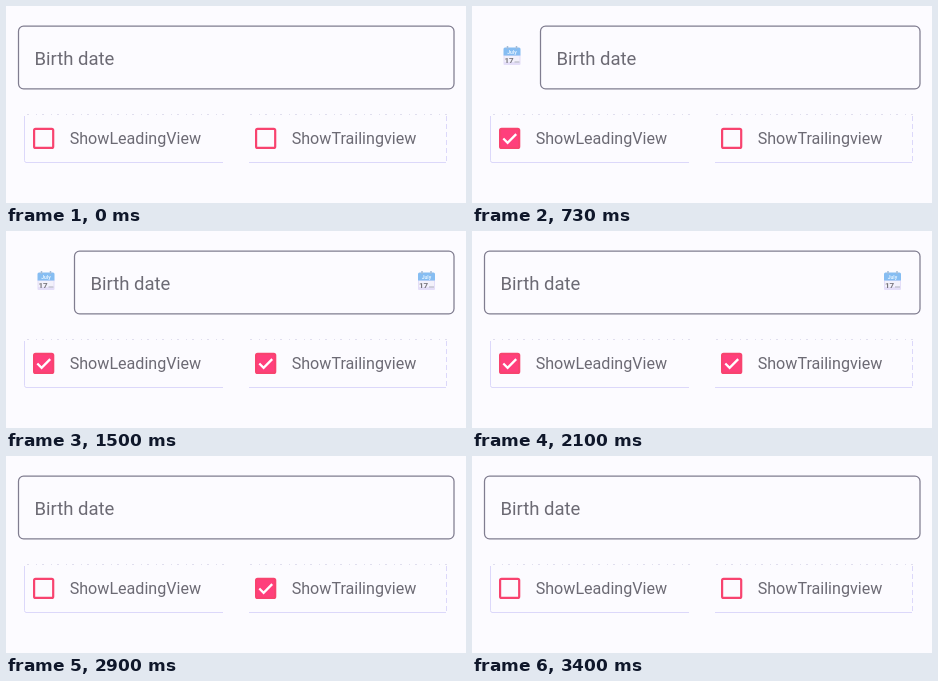
An HTML page for the animation above (3.53 s loop, 460 px wide and 197 px high).

```html
<!DOCTYPE html>
<html lang="en">
<head>
<meta charset="utf-8">
<style>
  html, body { margin: 0; width: 100%; height: 100%; overflow: hidden; background: #fcfbff; }
  svg { display: block; width: 460px; height: 197px; }
  text { font-family: Roboto, sans-serif; fill: #6c6a74; }
  .title { font-size: 18.5px; }
  .label { font-size: 16.1px; }
  .card { fill: none; stroke: #dcd8fa; }
  .dots { stroke-dasharray: 2 7 1 5; stroke: #e0deee; }
  .dashes { stroke-dasharray: 5 3; }
</style>
</head>
<body>
<svg viewBox="0 0 460 197">
  <defs>
    <g id="calendar">
      <rect x="1" y="9" width="17" height="10.5" rx="1" fill="#e4def8"/>
      <path d="M1 10V3.5q0-1.5 1.5-1.5h14q1.5 0 1.5 1.5V10z" fill="#86bdf2"/>
      <path d="M5 .5v3M14 .5v3" stroke="#a3bcd8" stroke-width="1.5"/>
      <text x="9.500" y="8" text-anchor="middle" style="font-size:5px;font-weight:700;fill:#e6f3ff">July</text>
      <path d="M2 10.500h15v6h-15z" fill="#f3f1fb"/>
      <text x="2" y="17.3" style="font-size:8px;font-weight:700;fill:#77757c">17</text>
      <path d="M12 16.500h5" stroke="#c5c5d2" stroke-width="1.5"/>
    </g>
    <g id="card" class="card">
      <path d="M2 48.500H199"/>
      <path class="dots" d="M3 .5H200"/>
    </g>
  </defs>

  <rect id="field" y="20.2" height="62.6" rx="5" fill="none" stroke="#807d90" stroke-width="1.25"/>
  <text id="title" class="title" y="58.5">Birth date</text>
  <use id="leadingIcon" href="#calendar" x="30.5" y="39.5"/>
  <use id="trailingIcon" href="#calendar" x="411" y="39.5"/>

  <use href="#card" x="18" y="108"/>
  <use href="#card" x="241" y="108"/>
  <path class="card" d="M18.500 110V154.500q0 2 2 2"/>
  <path class="card dashes" d="M440.500 110V156"/>
  <text class="label" x="63.700" y="138.4">ShowLeadingView</text>
  <text class="label" x="285.700" y="138.4">ShowTrailingview</text>
  <g id="leadingBox" transform="translate(27 121.7)"></g>
  <g id="trailingBox" transform="translate(249 121.7)"></g>
</svg>
<script>
const LOOP = 3530;
const $ = id => document.getElementById(id);
const ramp = (t, start, duration) => Math.min(1, Math.max(0, (t - start) / duration));

// The field reacts at on/off; the checkbox follows a moment later.
const toggles = [
  { name: 'leading', on: 530, off: 2000 },
  { name: 'trailing', on: 1200, off: 2900 }
];

for (const { name } of toggles) {
  $(name + 'Box').innerHTML = `
    <rect x="1.1" y="1.1" width="19.1" height="19.1" rx="1.5"
      fill="#ff3f7c" stroke="#f8436f" stroke-width="2.2"/>
    <path d="M4.3 10.75l4.3 4.3 8.6-8.6" pathLength="1" fill="none"
      stroke="#fff" stroke-width="2.3" stroke-dasharray="1 2"/>`;
}

function drawBox({ name, on, off }, t) {
  const [box, tick] = $(name + 'Box').children;
  const hideAt = off + 180;
  const fill = ramp(t, on + 40, 50) - ramp(t, hideAt, 100);
  const drawn = t < hideAt + 60 ? ramp(t, on + 40, 100) : 0;
  box.setAttribute('fill-opacity', fill);
  tick.setAttribute('stroke-dashoffset', 1 - drawn);
  tick.style.display = drawn > 0 ? '' : 'none';
}

function render(t) {
  for (const toggle of toggles) {
    toggle.shown = t >= toggle.on && t < toggle.off;
    $(toggle.name + 'Icon').style.display = toggle.shown ? '' : 'none';
    drawBox(toggle, t);
  }
  const left = toggles[0].shown ? 68.5 : 12.5;
  $('field').setAttribute('x', left);
  $('field').setAttribute('width', 448 - left);
  $('title').setAttribute('x', left + 16);
}

const start = performance.now();
function tick() {
  render((performance.now() - start) % LOOP);
  requestAnimationFrame(tick);
}
tick();
</script>
</body>
</html>
```
